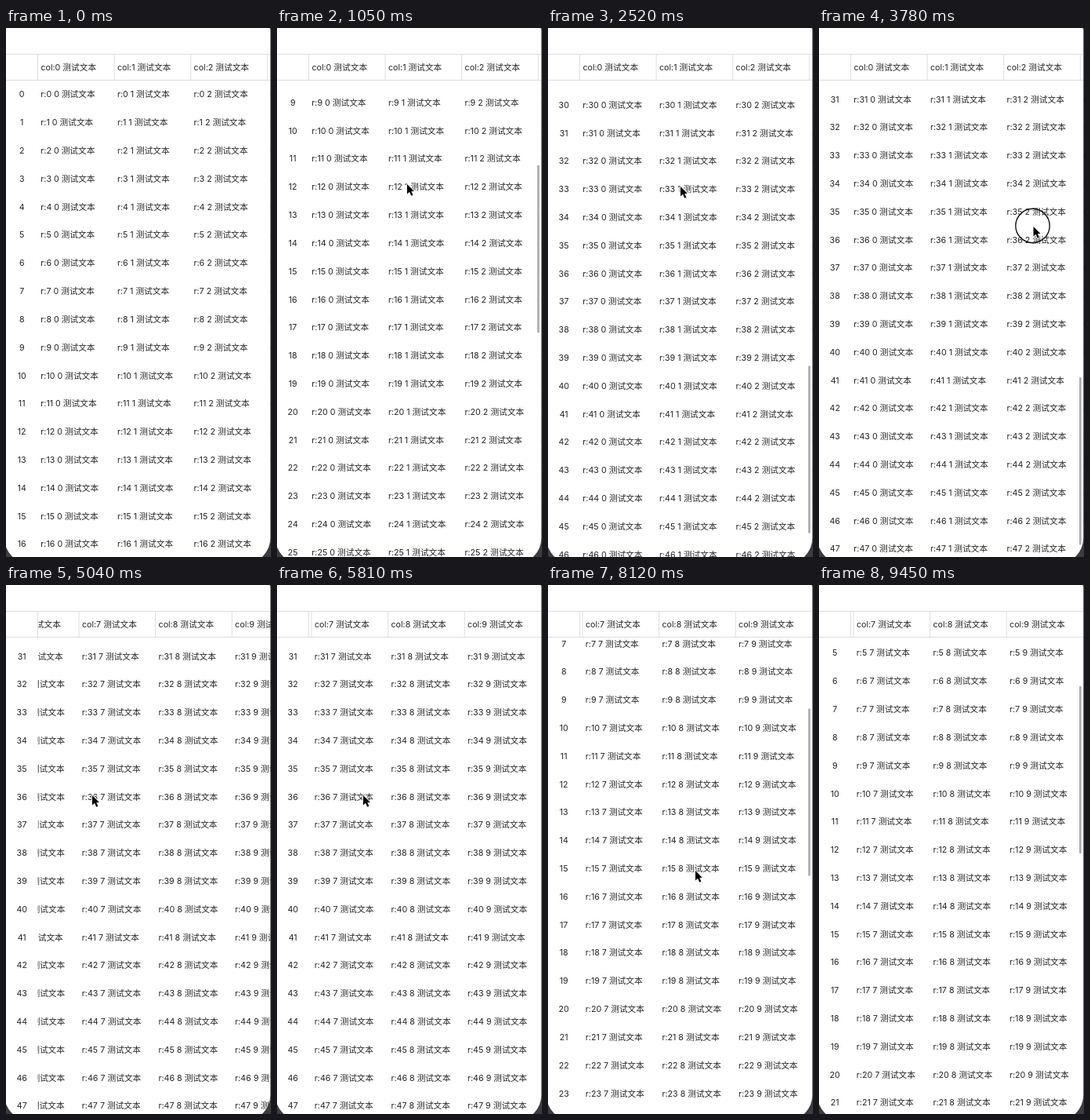
Recreate the animation shown at these times as an HTML page with a canvas. Size 338 by 674 pixels, loop 9520 ms.

```html
<!DOCTYPE html>
<html lang="zh">
<head>
<meta charset="utf-8">
<style>
  html, body { margin: 0; width: 100%; height: 100%; overflow: hidden; background: #fff; }
  canvas { display: block; width: 338px; height: 674px; }
</style>
</head>
<body>
<canvas id="stage"></canvas>
<script>
const W = 338, H = 674, LOOP = 9520;
const ROWS = 50, COLS = 10, ROW_H = 35.81, COL_W = 97.6;
const SIDE = 40.5, HEAD_TOP = 34, HEAD_BOTTOM = 66.5;
const MAX_X = 679.7, TAU = 522;
const LABEL = ' 测试文本';

const canvas = document.getElementById('stage');
const ctx = canvas.getContext('2d');
const dpr = window.devicePixelRatio || 1;
canvas.width = W * dpr;
canvas.height = H * dpr;

const clamp = (v, lo, hi) => Math.min(hi, Math.max(lo, v));
const progress = (t, from, to) => clamp((t - from) / (to - from), 0, 1);
const smooth = p => p * p * (3 - 2 * p);

// A swipe accelerates under the finger, then coasts with exponential decay
// until the next touch stops it.
const swipes = {
  up:    { press: 600,  start: 645,  end: 1050, stop: 3740, drag: 310.3, coast: 798.3 },
  left:  { press: 3740, start: 3810, end: 4100, stop: 6660, drag: 163, coast: 560 },
  down:  { press: 6660, start: 6712, end: 7050, stop: LOOP, drag: 228.9, coast: 705.2 }
};
const travelled = (s, t) => {
  const coasting = Math.max(0, Math.min(t, s.stop) - s.end);
  return s.drag * progress(t, s.start, s.end) ** 2
    + s.coast * (1 - Math.exp(-coasting / TAU));
};

const scrollY = t => travelled(swipes.up, t) - travelled(swipes.down, t);
const scrollX = t => Math.min(MAX_X, travelled(swipes.left, t));

// Resting points of the pointer between swipes: time, x, y.
const pointerPath = [
  [100, 350, 540], [570, 165, 507], [swipes.up.start, 165, 507],
  [swipes.up.end, 165, 197], [1680, 165, 197], [2520, 168, 200],
  [3000, 168, 200], [3650, 272.5, 251], [swipes.left.start, 272.5, 251],
  [swipes.left.end, 109, 266], [5950, 109, 266], [6600, 187, 133],
  [swipes.down.start, 187, 133], [swipes.down.end, 187, 362],
  [8700, 187, 362], [9300, 352, 430]
];

function pointerAt(t) {
  const i = pointerPath.findIndex(point => point[0] > t);
  if (i < 1) return null;
  const [t0, x0, y0] = pointerPath[i - 1], [t1, x1, y1] = pointerPath[i];
  const p = (t - t0) / (t1 - t0);
  const swiping = Object.values(swipes).some(s => s.start === t0);
  const k = swiping ? p * p : smooth(p);
  return [x0 + (x1 - x0) * k, y0 + (y1 - y0) * k];
}

function line(x1, y1, x2, y2) {
  ctx.beginPath();
  ctx.moveTo(x1, y1);
  ctx.lineTo(x2, y2);
  ctx.stroke();
}

function clipped(x, y, w, h, draw) {
  ctx.save();
  ctx.beginPath();
  ctx.rect(x, y, w, h);
  ctx.clip();
  draw();
  ctx.restore();
}

function drawTable(sx, sy) {
  ctx.font = '10.7px Inter, "Noto Sans CJK SC", "Noto Sans CJK", sans-serif';
  ctx.textBaseline = 'alphabetic';
  ctx.fillStyle = '#242424';
  ctx.strokeStyle = '#dedede';
  ctx.lineWidth = 1;

  const rowY = r => 88.4 + r * ROW_H - sy;
  const colX = c => SIDE + c * COL_W - sx;
  const rows = [...Array(ROWS).keys()].filter(r => rowY(r) > 50 && rowY(r) < H + 15);
  const cols = [...Array(COLS).keys()].filter(c => colX(c) > -COL_W && colX(c) < W);

  clipped(0, HEAD_BOTTOM, W, H, () => {
    ctx.textAlign = 'center';
    rows.forEach(r => ctx.fillText(r, 20.2, rowY(r)));
  });
  ctx.textAlign = 'left';
  clipped(SIDE, HEAD_BOTTOM, W, H, () => {
    for (const r of rows)
      for (const c of cols) ctx.fillText(`r:${r} ${c}${LABEL}`, colX(c) + 3.8, rowY(r));
  });
  clipped(SIDE, HEAD_TOP, W, HEAD_BOTTOM - HEAD_TOP, () => {
    for (const c of cols) {
      ctx.fillText(`col:${c}${LABEL}`, colX(c) + 3.9, 54);
      line(colX(c), HEAD_TOP, colX(c), HEAD_BOTTOM);
    }
  });
  line(SIDE, HEAD_TOP, SIDE, HEAD_BOTTOM);
  line(0, 33.5, W, 33.5);
  line(0, HEAD_BOTTOM, W, HEAD_BOTTOM);
}

function drawScrollbar(t, sy) {
  const { up, down } = swipes;
  ctx.globalAlpha = t < 3000
    ? progress(t, up.start, up.start + 80)
    : Math.max(1 - progress(t, 4000, 4250), progress(t, down.start, down.start + 80));
  ctx.fillStyle = '#aaa';
  ctx.beginPath();
  ctx.roundRect(332, 68.5 + sy * 0.341, 2.6, 213.5, 1.3);
  ctx.fill();
  ctx.globalAlpha = 1;
}

function drawPointer(t) {
  const at = pointerAt(t);
  if (!at) return;
  ctx.save();
  ctx.translate(...at);
  if (Object.values(swipes).some(s => t >= s.press && t < s.end)) {
    ctx.strokeStyle = '#111';
    ctx.lineWidth = 1.4;
    ctx.beginPath();
    ctx.arc(0, 1, 21.7, 0, Math.PI * 2);
    ctx.stroke();
  }
  const arrow = new Path2D('M1 2V14.4L4 11.8L6.2 16.8L8.4 15.8L6.3 11H10Z');
  ctx.lineJoin = 'round';
  ctx.lineWidth = 1.6;
  ctx.strokeStyle = '#fff';
  ctx.stroke(arrow);
  ctx.fillStyle = '#000';
  ctx.fill(arrow);
  ctx.restore();
}

function drawBezel() {
  ctx.fillStyle = '#3c3c40';
  ctx.beginPath();
  ctx.rect(0, 0, W, H);
  ctx.roundRect(-2, -1, 339.2, 683, [4, 4, 32, 32]);
  ctx.fill('evenodd');
}

function frame(now) {
  const t = now % LOOP;
  const sy = scrollY(t);
  ctx.setTransform(dpr, 0, 0, dpr, 0, 0);
  ctx.fillStyle = '#fff';
  ctx.fillRect(0, 0, W, H);
  drawTable(scrollX(t), sy);
  drawScrollbar(t, sy);
  clipped(0, 0, W, H, drawBezel);
  drawPointer(t);
}

const began = performance.now();
function tick() {
  frame(performance.now() - began);
  requestAnimationFrame(tick);
}
tick();
</script>
</body>
</html>
```
